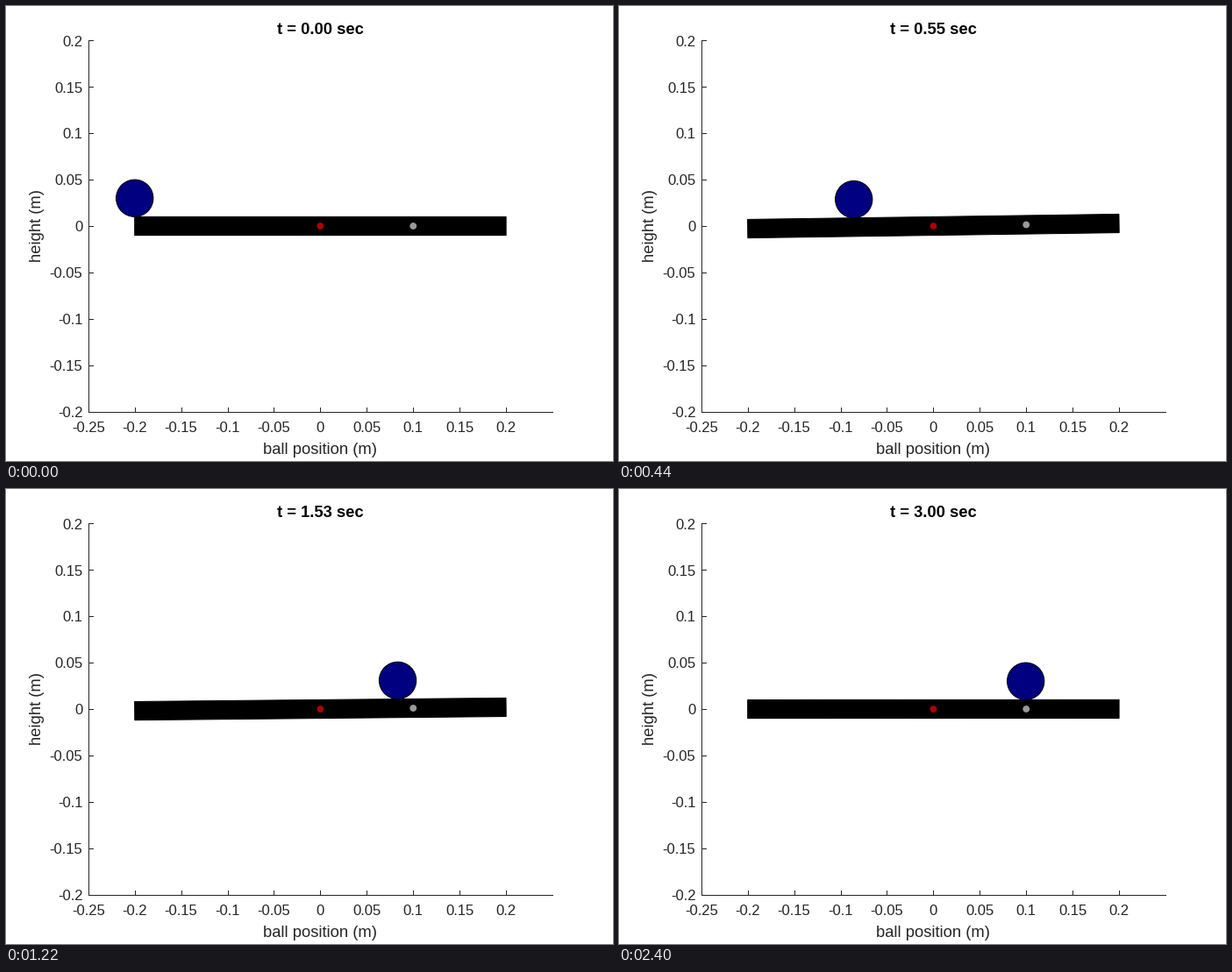
These frames come from a looping animation (692x519 px, 2.42 s). A matplotlib script:

```python
import numpy as np
import matplotlib.pyplot as plt
from matplotlib.animation import FuncAnimation
from matplotlib.patches import Circle, Polygon

W, H, DPI = 692, 519, 100
FRAMES, INTERVAL, DT = 121, 20, 0.025
X0, Y0, SCALE = 358.4, 251.0, 1058.5      # pixel of the pivot, pixels per metre
LEFT, RIGHT, TOP, BOTTOM = 94.5, 623.5, 39.5, 463.5
AXIS = "#262626"
START, GOAL, G = -0.2, 0.1, 9.81
BEAM_HALF, BEAM_T, BALL_R = 0.2, 0.01, 0.02
POLES = (-2.33, -4 + 4j, -4 - 4j, -25)

plt.rcParams["font.family"] = "Liberation Sans"


def px(size):
    return size * 72 / DPI


def to_px(points):
    return np.asarray(points) * (SCALE, -SCALE) + (X0, Y0)


def rotate(points, angle):
    c, s = np.cos(angle), np.sin(angle)
    return np.asarray(points) @ np.array([[c, s], [-s, c]])


def simulate(substeps=10):
    """Ball on a beam under state feedback; one (position, angle) per frame."""
    _, c3, c2, c1, c0 = np.real(np.poly(POLES))

    def rate(y):
        r, v, a, w = y
        torque = (c0 * (r - GOAL) + c1 * v) / G - c2 * a - c3 * w
        return np.array([v, r * w * w - G * np.sin(a), w, torque])

    h = DT / substeps
    y = np.array([START, 0, 0, 0], float)
    poses = []
    for _ in range(FRAMES):
        poses.append((y[0], y[2]))
        for _ in range(substeps):
            k1 = rate(y)
            k2 = rate(y + h / 2 * k1)
            k3 = rate(y + h / 2 * k2)
            k4 = rate(y + h * k3)
            y = y + h / 6 * (k1 + 2 * k2 + 2 * k3 + k4)
    return poses


POSES = simulate()

fig = plt.figure(figsize=(W / DPI, H / DPI), dpi=DPI, facecolor="white")
ax = fig.add_axes([0, 0, 1, 1])
ax.set_xlim(0, W)
ax.set_ylim(H, 0)
ax.axis("off")


def line(xs, ys):
    ax.plot(xs, ys, color=AXIS, lw=px(1), solid_capstyle="projecting", snap=False)


def label(x, y, text, size=16.67, color=AXIS, **kw):
    kw.setdefault("ha", "center")
    return ax.text(x, y, text, fontsize=px(size), color=color, va="baseline", **kw)


line([LEFT, LEFT], [TOP, BOTTOM])
line([LEFT, RIGHT], [BOTTOM, BOTTOM])
for i in range(-5, 5):
    x = X0 + i * 0.05 * SCALE
    tick = round(x) + 0.5
    line([tick, tick], [BOTTOM, BOTTOM - 5])
    label(x, 486.5, f"{i / 20:g}")
for i in range(-4, 5):
    y = Y0 - i * 0.05 * SCALE
    tick = round(y) + 0.5
    line([LEFT, LEFT + 5], [tick, tick])
    label(87.5, y + 6.3, f"{i / 20:g}", ha="right")

label(X0, 511, "ball position (m)", 18.33)
label(40.5, Y0, "height (m)", 18.33, rotation=90, rotation_mode="anchor")
title = label(X0, 32, "", 18.33, "black", weight="bold")

beam = Polygon(np.zeros((4, 2)), fc="black", ec="black", lw=px(1), joinstyle="miter")
ball = Circle((0, 0), BALL_R * SCALE, fc="#000080", ec="black", lw=px(1))
pivot = Circle((X0, Y0), 3.9, fc="#b00000", lw=0)
goal = Circle((0, 0), 3.9, fc="#999999", lw=0)
for z, part in enumerate((beam, ball, pivot, goal), 3):
    part.set(zorder=z, snap=False)
    ax.add_patch(part)

CORNERS = [(sx * BEAM_HALF, sy * BEAM_T)
           for sx, sy in ((-1, -1), (1, -1), (1, 1), (-1, 1))]


def draw(i):
    r, angle = POSES[i]
    beam.set_xy(to_px(rotate(CORNERS, angle)))
    ball.center = to_px(rotate((r, BEAM_T + BALL_R), angle))
    goal.center = to_px(rotate((GOAL, 0), angle))
    cents = (5 * i + 1) // 2
    title.set_text(f"t = {cents // 100}.{cents % 100:02d} sec")
    return beam, ball, pivot, goal, title


anim = FuncAnimation(fig, draw, frames=FRAMES, interval=INTERVAL,
                     repeat=True, repeat_delay=0, blit=False)
plt.show()
```
